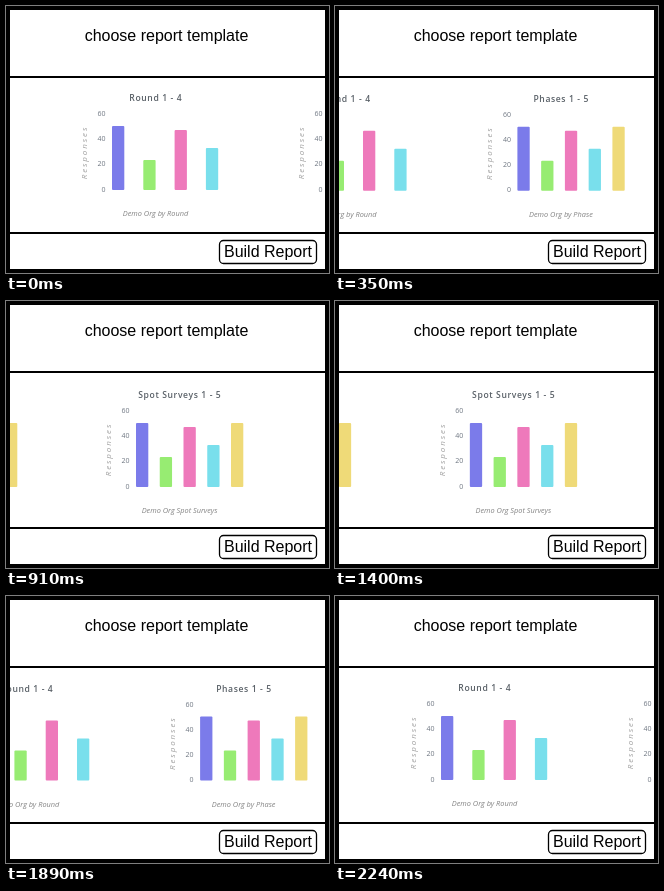
An HTML page with a canvas that plays this animation: 323x267 px, repeating every 2.31 s.

```html
<!DOCTYPE html>
<html lang="en">
<head>
<meta charset="utf-8">
<title>Report template</title>
<style>
  html, body { margin: 0; width: 100%; height: 100%; overflow: hidden; background: #fff; }
  canvas { display: block; }
</style>
</head>
<body>
<canvas id="stage" width="323" height="267"></canvas>
<script>
const ctx = document.getElementById('stage').getContext('2d');
const W = 323, H = 267;
const LOOP = 2310, TICK = 70;
const TRAVEL = 419, DRIFT = 2;
const UI = '16px "Liberation Sans", Arial, sans-serif';
const SANS = '"Open Sans", "Noto Sans", sans-serif';

// colour and height of each bar
const BARS = [['#7b7bea', 64], ['#97ec72', 30], ['#ee79bb', 60], ['#79dfec', 42], ['#efda78', 64]];
const CHARTS = [
  { x: 106, count: 4, pitch: 31.3, title: 'Round 1 - 4', note: 'Demo Org by Round' },
  { x: 323, count: 5, pitch: 23.75, title: 'Phases 1 - 5', note: 'Demo Org by Phase' },
  { x: 549, count: 5, pitch: 23.75, title: 'Spot Surveys 1 - 5', note: 'Demo Org Spot Surveys' }
];

// cubic-bezier(.42, 0, .58, 1)
function easeInOut(u) {
  if (u <= 0) return 0;
  if (u >= 1) return 1;
  let lo = 0, hi = 1;
  for (let i = 0; i < 24; i++) {
    const s = (lo + hi) / 2, r = 1 - s;
    const x = 1.26 * s * r * r + 1.74 * s * s * r + s * s * s;
    if (x < u) lo = s; else hi = s;
  }
  return lo * lo * (3 - 2 * lo);
}

function progress(t) {
  return easeInOut(t / 870) - easeInOut((t - 1330) / 910);
}

function text(str, x, y, font, color, align = 'center', spacing = 0) {
  ctx.font = font;
  ctx.fillStyle = color;
  ctx.textAlign = align;
  ctx.letterSpacing = spacing + 'px';
  ctx.fillText(str, x + (align === 'center' ? spacing / 2 : 0), y);
}

function roundRect(x, y, w, h, r) {
  ctx.beginPath();
  ctx.roundRect(x, y, w, h, r);
}

function drawChart({ x, count, pitch, title, note }) {
  const mid = x + 43.5;
  text(title, mid, 95, '600 8.6px ' + SANS, '#596067', 'center', 0.6);
  text(note, mid, 210, 'italic 7.4px ' + SANS, '#858585');

  for (let i = 0; i < 4; i++) {
    text(String(60 - i * 20), x - 6.5, 110 + i * 25.2, '7px ' + SANS, '#6d7580', 'right');
  }

  ctx.save();
  ctx.translate(x - 25, 147.5);
  ctx.rotate(-Math.PI / 2);
  text('Responses', 0, 0, 'italic 8px ' + SANS, '#a0a0a0', 'center', 1.9);
  ctx.restore();

  BARS.slice(0, count).forEach(([color, h], i) => {
    ctx.fillStyle = color;
    roundRect(x + i * pitch, 184 - h, 12.3, h, 1);
    ctx.fill();
  });
}

function drawFrame() {
  ctx.fillStyle = '#000';
  ctx.fillRect(0, 0, W, 4);
  ctx.fillRect(0, H - 4, W, 4);
  ctx.fillRect(0, 0, 4, H);
  ctx.fillRect(W - 4, 0, 4, H);
  ctx.fillRect(0, 70, W, 2);
  ctx.fillRect(0, 226, W, 2);

  text('choose report template', 160.5, 35, UI, '#000');
  ctx.strokeStyle = '#000';
  ctx.lineWidth = 1.3;
  roundRect(213.5, 234.5, 97, 23, 4);
  ctx.stroke();
  text('Build Report', 262, 251, UI, '#000');
}

function draw(t) {
  const p = progress(t);
  ctx.fillStyle = '#fff';
  ctx.fillRect(0, 0, W, H);

  ctx.save();
  ctx.beginPath();
  ctx.rect(4, 72, W - 8, 154);
  ctx.clip();
  ctx.translate(-TRAVEL * p, DRIFT * p);
  CHARTS.forEach(drawChart);
  ctx.restore();

  drawFrame();
}

const start = performance.now();
function loop() {
  const t = (performance.now() - start) % LOOP;
  draw(Math.floor(t / TICK) * TICK);
  requestAnimationFrame(loop);
}
loop();
</script>
</body>
</html>
```
